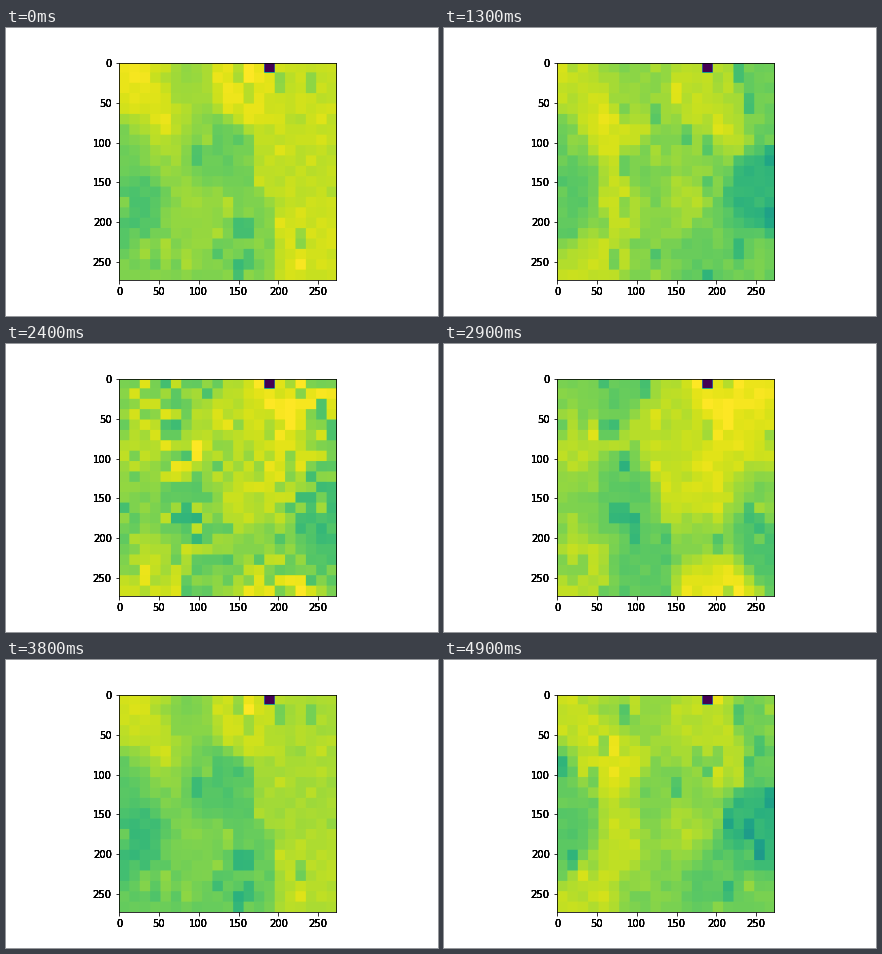
Write a matplotlib script that moves like this. It is 432 by 288 pixels and loops after 5 s.

```python
import matplotlib.pyplot as plt
import numpy as np
from matplotlib.animation import FuncAnimation

CELLS, CELL_SIZE = 21, 13
FRAMES, INTERVAL = 50, 100
HOLE = (0, 14)
ROWS, COLS = np.mgrid[:CELLS, :CELLS]

# Key points of each landscape: row, column, level
WARM_LEFT = [
    (1, 2, .97), (1, 6, .84), (1, 11, .97), (1, 17, .92),
    (5, 3, .95), (8, 1, .78), (7, 5, .88), (8, 8, .77),
    (14, 1, .72), (14, 7, .85), (17, 11, .80), (9, 17, .91),
    (18, 3, .81), (18, 18, .93),
]
COOL_RIGHT = [
    (1, 1, .91), (1, 6, .83), (5, 4, .94), (4, 14, .90),
    (2, 20, .78), (8, 0, .76), (9, 12, .81), (14, 1, .74),
    (14, 6, .93), (12, 9, .77), (12, 11, .90), (18, 3, .91),
    (18, 8, .80), (17, 15, .76), (14, 19, .66), (19, 19, .79),
]
COOL_MIDDLE = [
    (1, 1, .81), (1, 5, .77), (5, 1, .89), (5, 9, .90),
    (1, 17, .98), (5, 19, .95), (12, 1, .81), (11, 6, .75),
    (10, 12, .91), (10, 14, .95), (11, 19, .82), (15, 19, .72),
    (15, 14, .82), (18, 2, .90), (18, 7, .75), (19, 15, .97),
]


def landscape(points):
    """Blend the key points by distance, a little stretched along columns."""
    row, col, level = np.array(points).T[:, :, None, None]
    distance = ((ROWS - row) / 1.2) ** 2 + (COLS - col) ** 2
    weight = np.exp(-distance / 4) + 1e-3 / (1 + distance ** 2)
    return (weight * level).sum(axis=0) / weight.sum(axis=0)


def grain(seed):
    """Uneven cells with a few short dark and bright streaks."""
    rng = np.random.default_rng(seed)
    cells = rng.normal(0, .014, (CELLS, CELLS))
    for amount, share in ((-.09, .035), (.05, .03)):
        spots = rng.random((CELLS, CELLS)) < share
        cells[spots | np.roll(spots, 1, axis=0)] += amount
    return cells


def pose(points, seed, shift=0):
    return np.clip(landscape(points) + grain(seed) + shift, 0, 1)


POSES = [
    (0, pose(WARM_LEFT, 1)),
    (4, pose(WARM_LEFT, 2)),
    (13, pose(COOL_RIGHT, 3)),
    (18, pose(COOL_RIGHT, 4, .025)),
    (29, pose(COOL_MIDDLE, 5)),
    (38, pose(WARM_LEFT, 1, -.04)),
    (49, pose(COOL_RIGHT, 6)),
]
TURN = np.random.default_rng(11).uniform(.02, .98, (CELLS, CELLS))


def field(frame):
    # Each cell jumps to the next pose at its own moment.
    for (start, before), (end, after) in zip(POSES, POSES[1:]):
        if frame <= end:
            progress = (frame - start) / (end - start)
            grid = np.where(TURN < progress, after, before)
            break
    grid[HOLE] = 0
    return np.kron(grid, np.ones((CELL_SIZE, CELL_SIZE)))


def label_ticks(ax, ticks, layers=5):
    # Stacked copies harden the soft edges of the digits.
    for tick in list(ticks) * layers:
        ax.annotate(str(tick), (tick, 0), (0, -7), ha="center", va="top",
                    xycoords=ax.get_xaxis_transform(),
                    textcoords="offset points")
        ax.annotate(str(tick), (0, tick), (-7, 0), ha="right",
                    va="center_baseline",
                    xycoords=ax.get_yaxis_transform(),
                    textcoords="offset points")


plt.rcParams["font.family"] = "DejaVu Sans"
fig, ax = plt.subplots(figsize=(6, 4), dpi=72, facecolor="white")
fig.subplots_adjust(left=.125, right=.9, bottom=.125, top=.88)
image = ax.imshow(field(0), cmap="viridis", vmin=0, vmax=1)
ticks = range(0, 251, 50)
ax.set(xticks=ticks, yticks=ticks, xticklabels=[], yticklabels=[])
label_ticks(ax, ticks)


def update(frame):
    image.set_data(field(frame))
    return [image]


animation = FuncAnimation(fig, update, frames=FRAMES, interval=INTERVAL,
                          repeat=True, repeat_delay=0)
plt.show()
```
